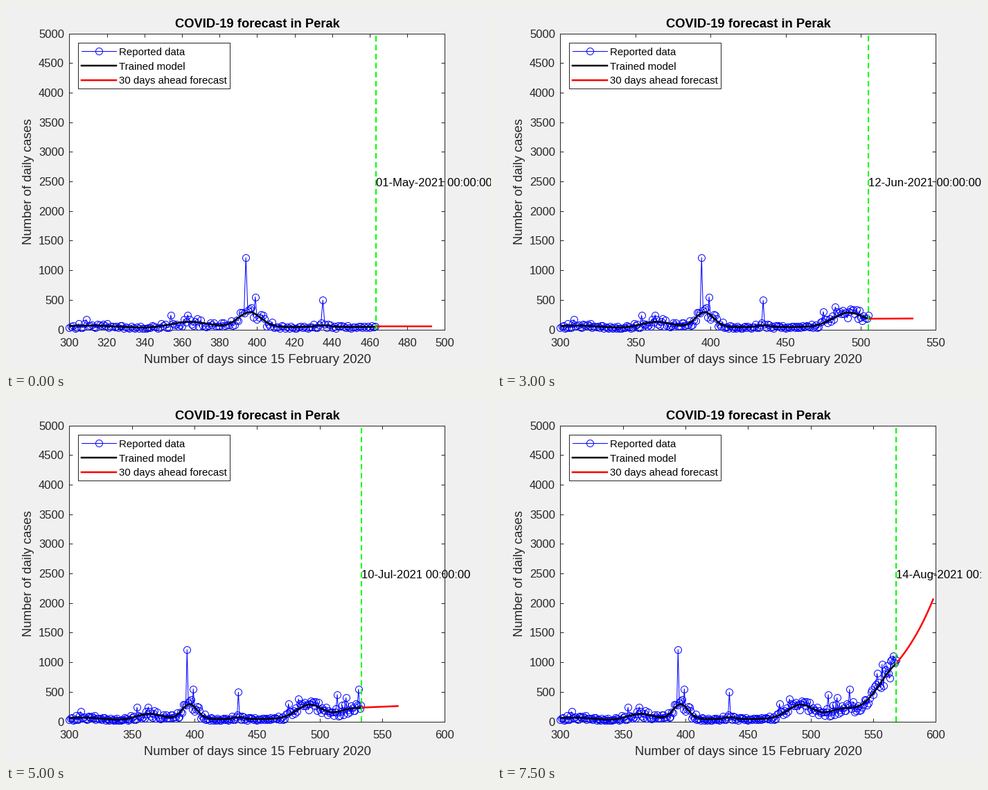
A matplotlib script that plays this animation: 700x525 px, repeating every 8 s.

```python
import numpy as np
import matplotlib.pyplot as plt
from matplotlib.animation import FuncAnimation
from matplotlib.patches import Rectangle
from matplotlib.transforms import offset_copy

W, H, DPI = 700, 525, 100
PX = 72 / DPI  # points per pixel
INK = (0.15, 0.15, 0.15)
BLUE, RED, GREEN = (0, 0, 1), (1, 0, 0), (0, 1, 0)
FIRST, START, STEP, HORIZON, FRAMES = 300, 463, 7, 30, 16
LAST = START + STEP * (FRAMES - 1)

plt.rcParams["font.family"] = "Liberation Sans"


def bump(day, center, height, width):
    return height * np.exp(-0.5 * ((day - center) / width) ** 2)


def rise(day, center, height, width):
    return height / (1 + np.exp((center - day) / width))


# Waves of infection: center day, height, width
WAVES = [(310, 22, 12), (341, -14, 8), (364, 88, 9.5), (396, 250, 6),
         (435, 28, 4), (492, 240, 10.5), (524, 130, 10)]
# Single days with an unusual count
SPIKES = {309: 165, 354: 240, 363: 245, 394: 1215, 399: 550, 435: 495,
          475: 300, 483: 380, 514: 455, 521: 400, 531: 545, 553: 810, 557: 965}


def trend(day):
    return 42 + sum(bump(day, *w) for w in WAVES) + rise(day, 555, 1170, 9.5)


def forecast(today):
    """Exponential path whose growth follows the current phase of the wave."""
    growth = bump(today, 491, 0.34, 6) + rise(today, 542, 0.76, 5)
    return trend(today) * np.exp(growth * np.linspace(0, 1, HORIZON + 1))


rng = np.random.default_rng(11)
days = np.arange(FIRST, LAST + 1)
model = trend(days)
spread = np.clip(0.75 - model / 700, 0.2, 0.7)
cases = np.maximum(model * (1 + spread * rng.uniform(-1, 1, days.size)), 12)
for day, count in SPIKES.items():
    cases[day - FIRST] = count

fig = plt.figure(figsize=(W / DPI, H / DPI), dpi=DPI, facecolor=(0.94,) * 3)
# Just short of half pixels, so that the frame snaps to the right columns
left, right, top, bottom = 91.49, 633.49, 39.51, 466.51
ax = fig.add_axes([left / W, 1 - bottom / H, (right - left) / W, (bottom - top) / H])
ax.set_ylim(0, 5000)
ax.set_yticks(range(0, 5001, 500))
ax.tick_params(direction="in", top=True, right=True, length=5 * PX, width=PX,
               color=INK, labelcolor=INK, labelsize=16.67 * PX)
ax.tick_params(axis="x", pad=12 * PX)
ax.tick_params(axis="y", pad=7.5 * PX)
for spine in ax.spines.values():
    spine.set(linewidth=PX, edgecolor=INK)

# Overlay in pixel coordinates for titles and legend
ui = fig.add_axes([0, 0, 1, 1])
ui.set(xlim=(0, W), ylim=(H, 0))
ui.axis("off")

DATA = dict(color=BLUE, lw=PX, marker="o", ms=10 * PX, mfc="none", mew=PX)
MODEL = dict(color="black", lw=2.5 * PX)
AHEAD = dict(color=RED, lw=2.5 * PX)


def label(x, y, text, size, **style):
    ui.text(x, y, text, fontsize=size * PX, va="baseline",
            rotation_mode="anchor", **style)


label(362.5, 31, "COVID-19 forecast in Perak", 18.33, ha="center", weight="bold")
label(362.5, 515, "Number of days since 15 February 2020", 18.33,
      ha="center", color=INK)
label(37, 253, "Number of daily cases", 18.33, ha="center", color=INK, rotation=90)

ui.add_patch(Rectangle((104, 53), 219, 66, fc="white", ec=INK, lw=PX))
entries = [("Reported data", DATA), ("Trained model", MODEL),
           ("30 days ahead forecast", AHEAD)]
for row, (name, style) in enumerate(entries):
    y = 65 + 20.75 * row
    ui.plot([109, 134, 159], [y] * 3, markevery=[1], **style)
    label(163, y + 5.8, name, 15)

data_line, = ax.plot([], [], clip_on=False, zorder=3, **DATA)
model_line, = ax.plot([], [], zorder=4, solid_capstyle="butt", **MODEL)
ahead_line, = ax.plot([], [], zorder=5, solid_capstyle="butt", **AHEAD)
nudged = offset_copy(ax.transData, fig, x=0.5, units="dots")
today_line, = ax.plot([], [], color=GREEN, lw=2 * PX, zorder=6, transform=nudged,
                      dashes=(4, 2.5), dash_capstyle="butt")
date_text = ax.text(START, 2420, "", fontsize=16.67 * PX, va="baseline",
                    zorder=7, transform=nudged)


def update(i):
    today = START + STEP * i
    n = today - FIRST + 1
    end = 50 * int(np.ceil((today + HORIZON) / 50))
    ax.set_xlim(FIRST, end)
    ax.set_xticks(range(FIRST, end + 1, 20 if end == 500 else 50))
    data_line.set_data(days[:n], cases[:n])
    model_line.set_data(days[:n], model[:n])
    ahead_line.set_data(np.arange(today, today + HORIZON + 1), forecast(today))
    today_line.set_data([today, today], [0, 5000])
    date = (np.datetime64("2021-05-01") + STEP * i).item()
    date_text.set_x(today)
    date_text.set_text(date.strftime("%d-%b-%Y 00:00:00"))
    return data_line, model_line, ahead_line, today_line, date_text


anim = FuncAnimation(fig, update, frames=FRAMES, interval=500,
                     repeat=True, repeat_delay=0, blit=False)
plt.show()
```
